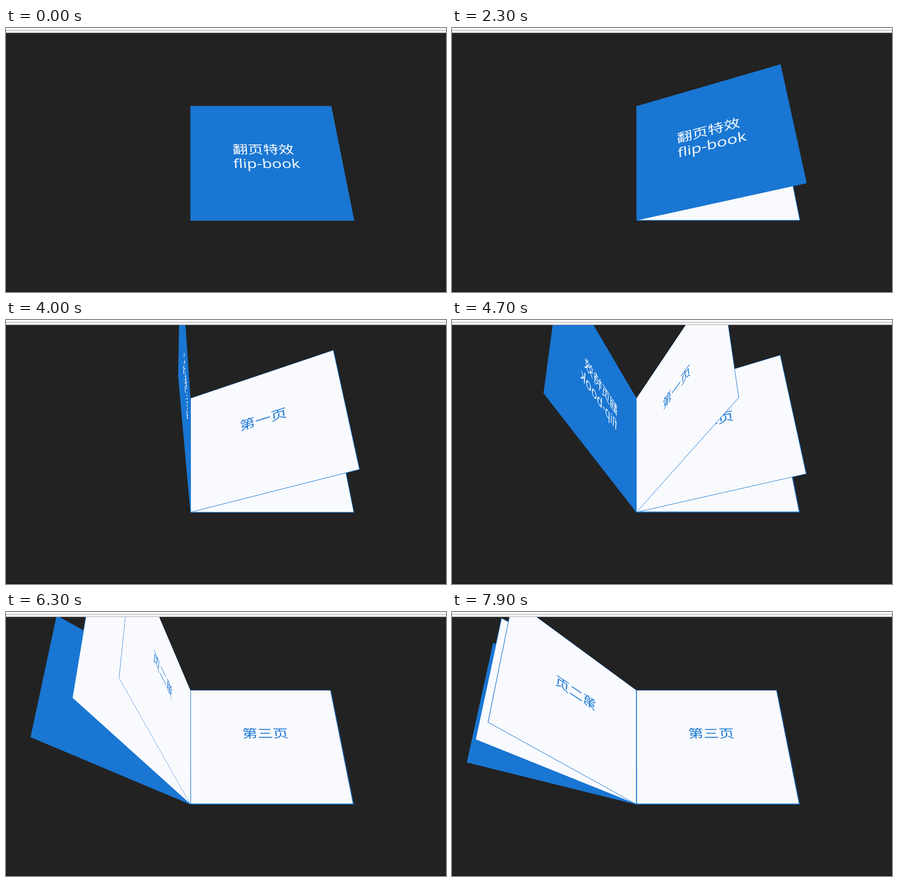
An HTML page for the animation above (8 s loop, 878 px wide and 526 px high).

```html
<!DOCTYPE html>
<html lang="zh">
<head>
<meta charset="utf-8">
<title>flip-book</title>
<style>
  html, body { margin: 0; width: 100%; height: 100%; overflow: hidden; background: #222; }
  #stage { position: relative; width: 878px; height: 526px; overflow: hidden; background: #222; }
  #bar { position: absolute; z-index: 20; left: 0; top: 0; width: 878px; height: 4px;
    background: #fafafe; border-bottom: 1px solid #a9a9a9;
    box-shadow: 0 4px #f1f1f1, 0 5px #b4b4b4; }
  #foot { position: absolute; left: 0; bottom: 0; width: 878px; height: 2px; background: #1c1a1a; }
  .page { position: absolute; left: 368px; top: 109.5px; width: 302px; height: 302px;
    box-sizing: border-box; border: 1px solid #1976d2; background: #f9fafe; color: #1976d2;
    transform-origin: 0 384.3px; }
  .cover { background: #1976d2; color: #fff; }
  .last { border-width: 1px 2px 2px 1px; border-right-color: #15569a; }
  .zh, .en { position: absolute; line-height: 40px; white-space: nowrap; }
  .zh { top: 102px; left: 0; width: 300px; text-align: center;
    font-family: "Noto Sans CJK SC", "Noto Sans CJK", sans-serif; font-size: 31px; }
  .cover .zh { left: 84px; text-align: left; }
  .en { top: 142px; left: 84px; font-family: "Open Sans", sans-serif; font-size: 32px; font-weight: 500; }
</style>
</head>
<body>
<div id="stage">
  <div id="foot"></div>
  <div class="page cover"><div class="zh">翻页特效</div><div class="en">flip-book</div></div>
  <div class="page"><div class="zh">第一页</div></div>
  <div class="page"><div class="zh">第二页</div></div>
  <div class="page last"><div class="zh">第三页</div></div>
  <div id="bar"></div>
</div>
<script>
  const LOOP = 8000, STEP = 100;
  const TILT = 'perspective(1000px) translateY(-233.3px) rotateX(30deg) translateY(233.3px)';
  const turns = [
    { start: 1374, length: 7800, angle: 160 },
    { start: 3208, length: 5920, angle: 150 },
    { start: 4090, length: 4655, angle: 140 },
    { start: 0, length: 1, angle: 0 }
  ];
  const pages = [...document.querySelectorAll('.page')];

  // cubic-bezier(.25, .1, .25, 1), solved by bisection
  function ease(x) {
    if (x <= 0) return 0;
    if (x >= 1) return 1;
    let lo = 0, hi = 1;
    for (let i = 0; i < 30; i++) {
      const p = (lo + hi) / 2;
      if (.75 * p - .75 * p * p + p * p * p < x) lo = p; else hi = p;
    }
    return .3 * lo + 2.4 * lo * lo - 1.7 * lo * lo * lo;
  }

  function draw(time) {
    turns.forEach((turn, i) => {
      const angle = turn.angle * ease((time - turn.start) / turn.length);
      const style = pages[i].style;
      style.transform = `${TILT} rotateY(${-angle}deg)`;
      // right stack: first page on top; left stack: latest page on top
      style.zIndex = angle > 90 ? 10 + i : 9 - i;
    });
  }

  function tick() {
    const time = performance.now() % LOOP;
    draw(Math.floor(time / STEP) * STEP);
    requestAnimationFrame(tick);
  }
  tick();
</script>
</body>
</html>
```
